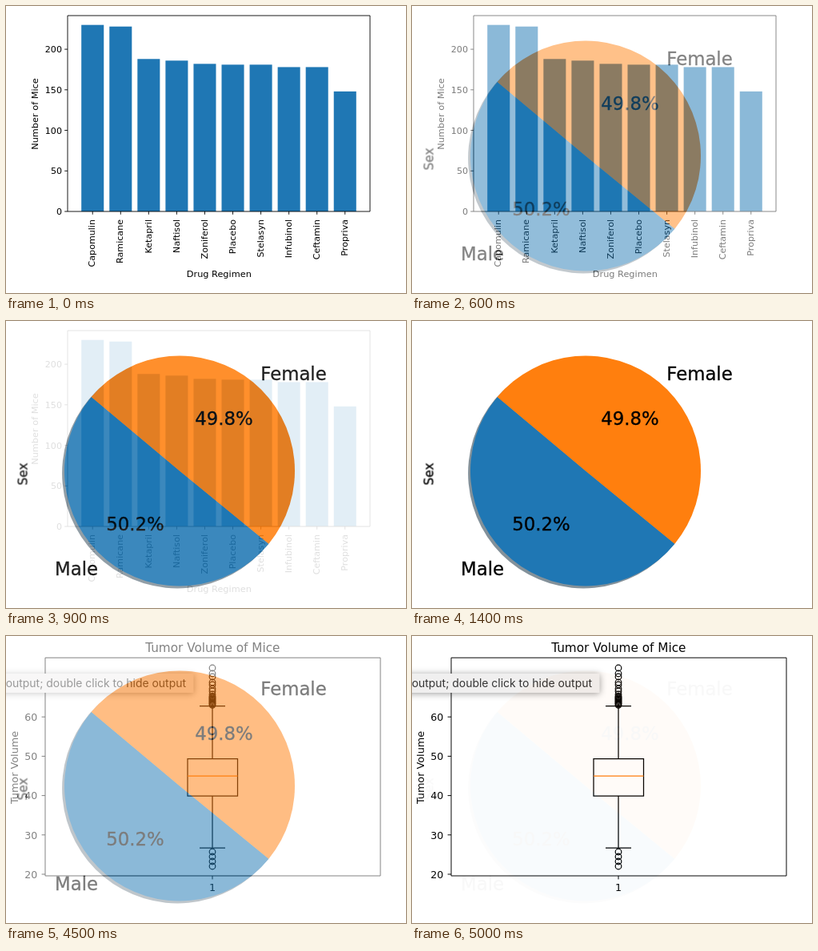
Write an HTML page that moves like this. It is 500 px wide and 359 px high and loops after 8000 ms.

```html
<!DOCTYPE html>
<html lang="en">
<head>
<meta charset="utf-8">
<title>Mouse study charts</title>
<style>
  html, body { margin: 0; width: 100%; height: 100%; overflow: hidden; background: #fff; }
  svg { display: block; width: 100%; height: 100%; font-family: "DejaVu Sans", Verdana, sans-serif; }
  .tip { filter: drop-shadow(0 1px 4px rgba(0, 0, 0, .4)); }
  .soft { filter: blur(.5px); }
  .soft text { stroke: #000; stroke-width: .3px; }
</style>
</head>
<body>
<svg id="stage" viewBox="0 0 500 359"></svg>
<script>
const BLUE = '#1f77b4', ORANGE = '#ff7f0e';

const text = (x, y, s, size, anchor = 'middle', turn = 0) =>
  `<text transform="translate(${x} ${y}) rotate(${turn})" font-size="${size}" text-anchor="${anchor}">${s}</text>`;
const path = (d, width = 1, color = '#000') =>
  `<path d="${d}" fill="none" stroke="${color}" stroke-width="${width}"/>`;
const rect = (x, y, w, h, fill) =>
  `<rect x="${x}" y="${y}" width="${w}" height="${h}" fill="${fill}"/>`;
const layer = (id, body) => `<g id="${id}">${rect(0, 0, 500, 359, '#fff')}${body}</g>`;

function barChart() {
  const left = 77, right = 455, top = 12, base = 257, size = 11.1;
  const unit = (base - top) / 241.5, step = 35.06, width = step * 0.8;
  const mice = {
    Capomulin: 230, Ramicane: 228, Ketapril: 188, Naftisol: 186, Zoniferol: 182,
    Placebo: 181, Stelasyn: 181, Infubinol: 178, Ceftamin: 178, Propriva: 148
  };
  let out = '', ticks = '';
  Object.entries(mice).forEach(([name, n], i) => {
    const x = 94.2 + i * step, mid = x + width / 2;
    out += rect(x, base - n * unit, width, n * unit, BLUE);
    out += text(mid + 3.2, 267, name, size, 'end', -90);
    ticks += `M${mid} ${base}v3.8`;
  });
  for (let n = 0; n <= 200; n += 50) {
    const y = base - n * unit;
    out += text(70, y + 4.2, n, size, 'end');
    ticks += `M${left} ${y}h-3.8`;
  }
  return out + path(`M${left} ${top}H${right}V${base}H${left}Z${ticks}`, 0.9)
    + text(266.3, 339, 'Drug Regimen', 11.3)
    + text(39.8, 135, 'Number of Mice', 11.3, 'middle', -90);
}

function pieChart() {
  const cx = 217, cy = 187.5, r = 144, shift = r * 0.02, size = 22.8;
  const start = 140, split = start + 360 * 0.502;
  const at = deg => {
    const a = deg * Math.PI / 180;
    return `${cx + r * Math.cos(a)} ${cy - r * Math.sin(a)}`;
  };
  const wedge = (from, to, fill) =>
    `<path d="M${cx} ${cy}L${at(from)}A${r} ${r} 0 ${+(to - from > 180)} 0 ${at(to)}Z" fill="${fill}"/>`;
  const wedges = (male, female) => wedge(start, split, male) + wedge(split, start + 360, female);
  return `<g class="soft"><g opacity=".5" transform="translate(${-shift} ${shift})">${wedges('#092436', '#4d2604')}</g>`
    + wedges(BLUE, ORANGE)
    + text(318.3, 73.5, 'Female', size, 'start') + text(115, 318, 'Male', size, 'end')
    + text(272.5, 130, '49.8%', size) + text(161.5, 262, '50.2%', size)
    + text(26.5, 191.5, 'Sex', 15.3, 'middle', -90) + '</g>';
}

function boxPlot() {
  const left = 49, right = 468, top = 27.2, base = 300, mid = 258, size = 12.6;
  const outliers = [40, 47, 51, 58, 61, 66, 69, 73, 270, 276, 282, 288];
  for (let y = 75.5; y < 87; y += 1.2) outliers.push(y);
  let out = '', ticks = `M${mid} ${base}v4.4`;
  for (let n = 20; n <= 60; n += 10) {
    const y = 298 - (n - 20) * 4.92;
    out += text(39.3, y + 4.7, n, size, 'end');
    ticks += `M${left} ${y}h-4.4`;
  }
  out += path(`M${left} ${top}H${right}V${base}H${left}Z${ticks}`)
    + path('M227 153.7H289.5V200H227ZM258 153.7V87.5M258 200V265M242 87.5H274M242 265H274', 1.25)
    + path('M227 175H289.5', 1.25, ORANGE);
  for (const y of outliers)
    out += `<circle cx="${mid}" cy="${y}" r="3.8" fill="none" stroke="#000" stroke-width="1.2"/>`;
  return out
    + text(258.3, 20.2, 'Tumor Volume of Mice', 15.25)
    + text(14.5, 164.5, 'Tumor Volume', 12.8, 'middle', -90)
    + text(mid, 319, 1, size)
    + `<g class="tip">${rect(-20, 47, 254.5, 24, '#f0efef')}</g>`
    + `<g font-family="Inter, sans-serif" fill="#303030">${text(225, 64, 'output; double click to hide output', 13.95, 'end')}</g>`;
}

const stage = document.getElementById('stage');
stage.innerHTML = layer('bars', barChart()) + layer('pie', pieChart()) + layer('box', boxPlot());
const pie = document.getElementById('pie'), box = document.getElementById('box');

// Cubic ease-out in tenths; a fade shows its first tenth at once.
function fade(t, start, last) {
  if (t < start) return 0;
  const n = Math.min(Math.floor((t - start) / 100) + 1, last);
  return 1 - (1 - n / 10) ** 3;
}

function draw() {
  const t = performance.now() % 8000;
  pie.setAttribute('opacity', fade(t, 500, 10));
  box.setAttribute('opacity', fade(t, 4400, 7));
  requestAnimationFrame(draw);
}
draw();
</script>
</body>
</html>
```
